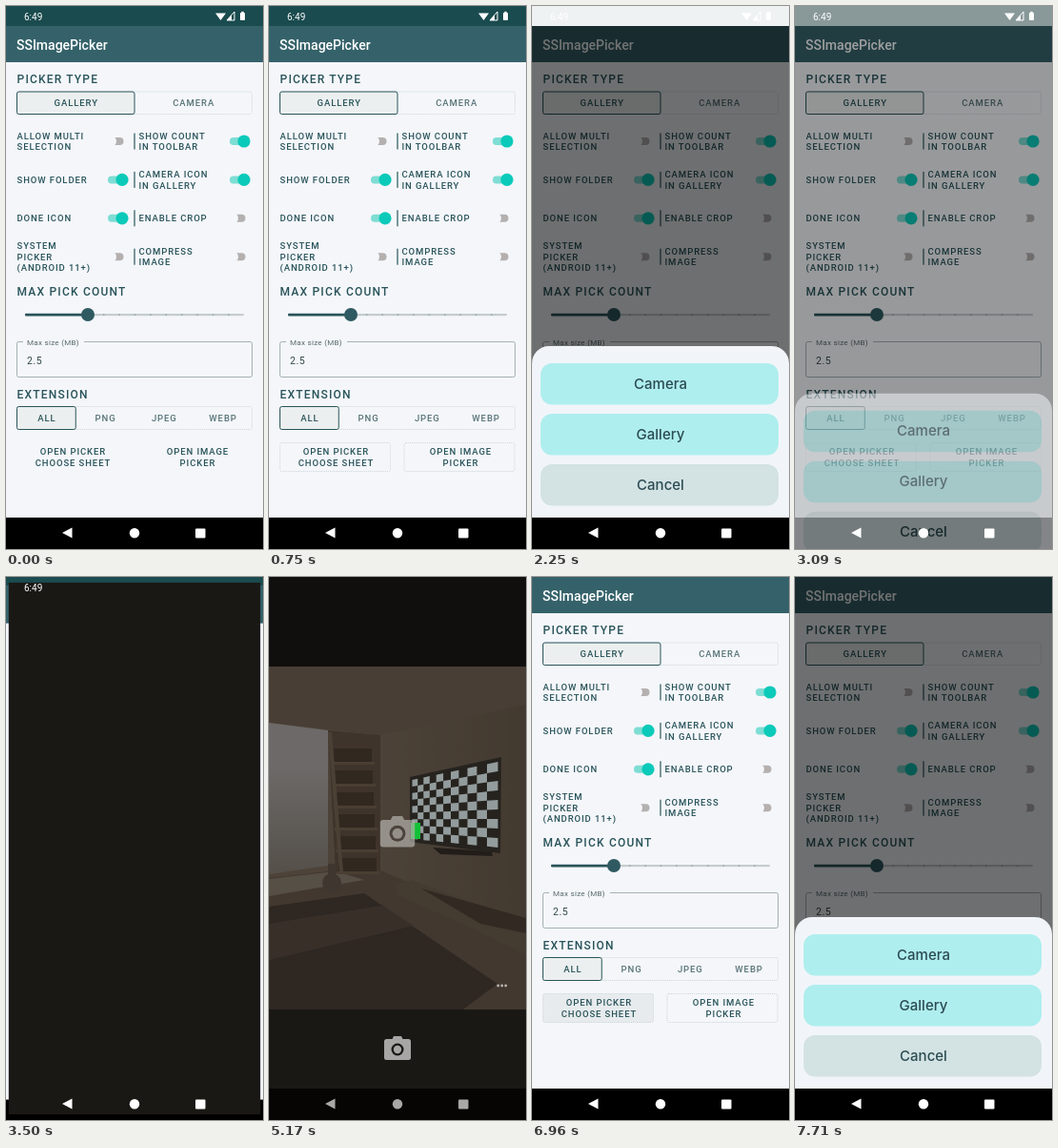
Animation, 270 px wide and 570 px high, one loop 7750 ms. Source, as an HTML page:

```html
<!DOCTYPE html>
<html lang="en">
<head>
<meta charset="utf-8">
<title>Image picker demo</title>
<style>
  html, body { margin: 0; width: 100%; height: 100%; overflow: hidden; background: #000; }
  svg { display: block; width: 100vw; height: 100vh; }
  text { font-family: Roboto, sans-serif; font-weight: 500; }
  .sheet text { font-family: Inter, sans-serif; }
  .thin { font-weight: 400; }
</style>
</head>
<body>
<svg id="stage" viewBox="0 0 270 570"></svg>
<script>
const LOOP = 7750;
const INK = '#29545a', SOFT = '#587478', PAPER = '#f4f6fa', TEAL = '#0bcab9', DARK = '#1a1815';

// ---- drawing helpers ----
const range = n => [...Array(n).keys()];
const rect = (x, y, w, h, fill, more = '') =>
  `<rect x="${x}" y="${y}" width="${w}" height="${h}" fill="${fill}" ${more}/>`;
const circle = (x, y, r, fill) => `<circle cx="${x}" cy="${y}" r="${r}" fill="${fill}"/>`;
const poly = (points, fill, more = '') => `<polygon points="${points}" fill="${fill}" ${more}/>`;
const group = (id, body, more = '') => `<g id="${id}" ${more}>${body}</g>`;

// y is the middle of the capitals
const text = (x, y, s, size = 9.5, gap = 0.9, fill = INK, more = '') =>
  `<text x="${x}" y="${y + size * 0.355}" font-size="${size}" letter-spacing="${gap}" fill="${fill}" ${more}>${s}</text>`;
const middle = (x, y, s, fill = INK) => text(x + 0.45, y, s, 9.5, 0.9, fill, 'text-anchor="middle"');
const heading = (y, s) => text(11.5, y, s, 12, 1.2);
const thin = (x, y, s, size, gap, fill) => text(x, y, s, size, gap, fill, 'class="thin"');
const lines = (x, y, list, draw = text) =>
  list.map((s, i) => draw(x, y + (i - (list.length - 1) / 2) * 11.5, s)).join('');

const outline = (x, y, w, h, on) => on
  ? rect(x, y, w, h, '#ecefef', `rx="2" stroke="${INK}"`)
  : rect(x, y, w, h, 'none', 'rx="2" stroke="#c3ccd0" stroke-width=".8" stroke-dasharray="1 1"');

const toggle = (x, y, on) => on
  ? rect(x - 4, y - 4, 20, 8, '#7eddd4', 'rx="4"') + circle(x + 11, y, 6.6, TEAL)
  : rect(x - 3, y - 4, 15.5, 8, '#b4b0af', 'rx="4"') + circle(x - 1, y, 6, PAPER);

// equal tabs with the first one chosen
const tabs = (y, h, names) => {
  const w = 247 / names.length;
  return outline(11.5, y, 247, h) + outline(11.5, y, w, h, true) +
    names.map((s, i) => middle(11.5 + (i + 0.5) * w, y + h / 2, s, i ? SOFT : INK)).join('');
};

const cameraIcon = (x, y, scale, fill, hole) =>
  `<g transform="translate(${x} ${y}) scale(${scale})">` +
  poly('-6,-9 -4,-13 4,-13 6,-9', fill) + rect(-14, -10, 28, 22, fill, 'rx="2.5"') +
  circle(0, 1, 6.5, hole) + circle(0, 1, 4.2, fill) + '</g>';

// ---- settings page ----
const options = [
  ['ALLOW MULTI|SELECTION', false, 'SHOW COUNT|IN TOOLBAR', true],
  ['SHOW FOLDER', true, 'CAMERA ICON|IN GALLERY', true],
  ['DONE ICON', true, 'ENABLE CROP', false],
  ['SYSTEM|PICKER|(ANDROID 11+)', false, 'COMPRESS|IMAGE', false]
];

function option([left, leftOn, right, rightOn], i) {
  const y = 142 + i * 40.4;
  return lines(11.5, y, left.split('|')) + toggle(111, y, leftOn) +
    rect(134.2, y - 8.5, 1.6, 17, '#5d7d82') +
    lines(139.5, y, right.split('|')) + toggle(239, y, rightOn);
}

const slider = y =>
  rect(20, y - 1, 230, 2.2, '#c6cccf', 'rx="1"') +
  range(14).map(i => rect(20 + i * 16.4, y - 0.6, 1.4, 1.4, '#8fa1a5')).join('') +
  rect(20, y - 1.2, 66, 2.6, INK, 'rx="1"') + circle(86, y, 7, '#2f5a61');

const sizeField = () =>
  rect(11.5, 352.5, 247, 37, 'none', 'rx="2" stroke="#8fa0a3" stroke-width=".8"') +
  rect(18, 349, 64, 8, PAPER) +
  thin(22, 353, 'Max size (MB)', 8, 0.3, '#57696c') + thin(22, 372, '2.5', 10.5, 0.5, '#34484b');

const settings = () =>
  rect(0, -1, 270, 22.5, '#1a4b4e') + rect(0, 21, 270, 38, '#35626a') +
  text(11, 41, 'SSImagePicker', 14, 0, '#fff') +
  heading(77, 'PICKER TYPE') + tabs(90, 23.5, ['GALLERY', 'CAMERA']) +
  options.map(option).join('') +
  heading(300, 'MAX PICK COUNT') + slider(324) + sizeField() +
  heading(408, 'EXTENSION') + tabs(420.5, 24, ['ALL', 'PNG', 'JPEG', 'WEBP']) +
  group('press', rect(11.5, 458.5, 116, 30, '#e7ebed', 'rx="2"')) +
  group('frames', outline(11.5, 458.5, 116, 30) + outline(142, 458.5, 116, 30)) +
  lines(70, 473.5, ['OPEN PICKER', 'CHOOSE SHEET'], middle) +
  lines(201, 473.5, ['OPEN IMAGE', 'PICKER'], middle);

// ---- bottom sheet ----
const sheet = () =>
  '<path d="M0 537V375a18 18 0 0 1 18-18H252a18 18 0 0 1 18 18V537Z" fill="#f1f5f9"/>' +
  ['Camera', 'Gallery', 'Cancel'].map((name, i) => {
    const y = 375 + i * 53;
    return rect(9, y, 250, 43.5, i < 2 ? '#afeeee' : '#d3e2e3', 'rx="12"') +
      text(135, y + 21.5, name, 15, 0, '#2b4b52', 'text-anchor="middle"');
  }).join('');

// ---- room seen by the camera ----
function screen() {
  const cols = 11, rows = 9;
  // the right edge is nearer, so cells widen towards it
  const at = (c, r) => {
    const u = c / cols, s = u * 62 / (91 - 29 * u);
    const top = 213 - 19 * s, height = 62 + 28 * s;
    return `${(150.5 + 90 * s).toFixed(1)},${(top + height * r / rows).toFixed(1)}`;
  };
  const cells = range(cols * rows).filter(i => i % 2 === 0).map(i => {
    const c = Math.floor(i / rows), r = i % rows;
    return poly([at(c, r), at(c + 1, r), at(c + 1, r + 1), at(c, r + 1)].join(' '), '#939c9c');
  });
  return poly('148,210 244,189 243,290 148,278', '#26231f') + cells.join('') +
    rect(149, 258, 10, 17, '#12c037');
}

const shelves = () =>
  poly('62,161 117,166 117,308 70,311', '#8d7761') +
  range(6).map(i => rect(68 + i, 180 + i * 23, 40, 14, '#6d5a49') +
    rect(66 + i, 194 + i * 23, 45, 3, '#a88f73')).join('') +
  poly('62,163 66,163 78,310 74,310', '#ab9277');

const room = () =>
  rect(0, 0, 270, 94, '#100f0e') + rect(0, 94, 270, 360, 'url(#wall)') +
  poly('0,94 270,94 270,134 117,166 0,153', '#a38e78') +
  poly('0,153 62,161 62,303 0,312', 'url(#window)') +
  poly('0,316 70,308 117,308 270,372 270,454 0,454', '#94806b') +
  poly('0,317 70,309 100,318 0,335', '#c4b5a1') +
  shelves() +
  poly('0,346 100,332 240,427 204,454 0,454', '#66584c') +
  poly('0,364 118,345 152,366 0,402', '#7d6c5d') +
  poly('134,322 150,318 270,362 270,396 220,372 134,333', '#9a8670') +
  poly('160,327 270,358 270,374 222,364', '#6f5d4c') +
  poly('172,284 234,288 235,293 180,291', '#4d4238') +
  circle(66, 321, 10, '#8e7d6c') + rect(62, 301, 8, 14, '#8e7d6c');

const cameraPage = () =>
  rect(0, 0, 270, 570, DARK) +
  group('room', room() + group('shade', rect(0, 94, 270, 360, '#050302')) + screen()) +
  group('splash', cameraIcon(135, 268, 1.3, '#b5b2ac', '#4c453e')) +
  group('controls', cameraIcon(135, 495, 1, '#fff', DARK) +
    range(3).map(i => circle(240.7 + i * 4, 429, 1.4, '#fff')).join('')) +
  group('cameraNav', rect(0, 537, 270, 33, '#060504'));

// ---- system icons ----
const statusIcons = () =>
  poly('220,7.5 231,7.5 225.5,15', '#fff') +
  poly('232,15 240,15 240,6', 'none', 'stroke="#fff"') + poly('232,15 237,15 237,9.5', '#fff') +
  rect(246, 7, 5, 8, '#fff', 'rx=".8"') + rect(247.3, 5.8, 2.4, 2, '#fff');

const navIcons = () =>
  poly('59,553 69.5,547.5 69.5,558.5', '#fff') + circle(135, 553.3, 5.2, '#fff') +
  rect(199, 548.5, 10.5, 10, '#fff', 'rx="1"');

const stage = document.getElementById('stage');
stage.innerHTML = `<defs>
  <linearGradient id="wall"><stop offset=".35" stop-color="#ae9a83"/><stop offset="1" stop-color="#97836d"/></linearGradient>
  <linearGradient id="window" x2="0" y2="1"><stop offset=".3" stop-color="#f6f3ef"/><stop offset="1" stop-color="#c0b6a8"/></linearGradient></defs>` +
  group('page', rect(0, 0, 270, 570, PAPER) + group('content', settings()) + rect(0, 537, 270, 33, '#000')) +
  group('dim', rect(0, 0, 270, 570, '#000')) +
  group('strip', rect(0, -1, 270, 22, '#eef2f2')) +
  group('sheet', sheet(), 'class="sheet"') +
  group('camera', cameraPage()) +
  group('clock', thin(19, 11, '6:49', 10, 0, '#fff')) +
  group('signals', statusIcons()) +
  group('nav', navIcons());

const part = {};
stage.querySelectorAll('g[id]').forEach(g => { part[g.id] = g; });

// ---- motion ----
const easeIn = p => p * p;
const easeOut = p => 1 - (1 - p) ** 2;
const easeInOut = p => p < 0.5 ? 2 * p * p : 1 - 2 * (1 - p) ** 2;
const ramp = (t, from, to, ease = p => p) => ease(Math.max(0, Math.min(1, (t - from) / (to - from))));
const pulse = (t, a, b, c, d) => ramp(t, a, b) - ramp(t, c, d);

const OPEN = 1670, CLOSE = 2926, LAUNCH = 3250, PREVIEW = 4710, BACK = 5950, REOPEN = 7090;

const fade = (name, v) => part[name].setAttribute('opacity', v);
const slide = (name, y) => part[name].setAttribute('transform', `translate(0 ${y})`);
const zoom = (name, k) =>
  part[name].setAttribute('transform', `translate(135 285) scale(${k}) translate(-135 -285)`);

function draw(t) {
  // settings page and its buttons
  fade('frames', ramp(t, 0, 800));
  fade('press', pulse(t, 1300, 1420, 1750, 1950) + pulse(t, 6900, 6960, 7150, 7350));
  const shift = -21 * ramp(t, 6200, 6250);
  slide('content', shift);

  // sheet
  const shown = pulse(t, OPEN, OPEN + 200, CLOSE, CLOSE + 364) + ramp(t, REOPEN, REOPEN + 200);
  const raised = ramp(t, OPEN, OPEN + 250, easeOut) - ramp(t, CLOSE, CLOSE + 250, easeIn) +
    ramp(t, REOPEN, REOPEN + 250, easeOut);
  fade('dim', 0.55 * (pulse(t, OPEN, OPEN + 250, CLOSE, CLOSE + 530) + ramp(t, REOPEN, REOPEN + 250)));
  fade('sheet', shown);
  fade('strip', shown);
  slide('sheet', 114 * (1 - raised));
  slide('strip', shift);

  // camera page comes and goes
  const back = ramp(t, BACK, BACK + 340, easeInOut);
  zoom('page', t < PREVIEW ? 1 + 0.05 * ramp(t, LAUNCH, LAUNCH + 350, easeOut) : 1.1 - 0.1 * back);
  zoom('camera', 0.85 + 0.15 * ramp(t, LAUNCH, LAUNCH + 400, easeOut) - 0.1 * back);
  fade('camera', pulse(t, LAUNCH, LAUNCH + 150, BACK + 35, BACK + 285));
  fade('splash', 0.7 * pulse(t, 4000, 4380, 5170, 5400));
  fade('room', ramp(t, PREVIEW, 5170));
  fade('shade', 0.57 * (1 - ramp(t, 5170, 5460)));
  fade('controls', ramp(t, PREVIEW, 5460));
  fade('cameraNav', pulse(t, PREVIEW, 5170, BACK, BACK + 60));

  // system icons
  fade('clock', 1 - ramp(t, 4000, 4380));
  fade('signals', 1 - ramp(t, LAUNCH, LAUNCH + 100));
  fade('nav', 1 - 0.35 * pulse(t, PREVIEW, 5170, 5170, 5460));
}

const start = performance.now();
function tick() {
  draw((performance.now() - start) % LOOP);
  requestAnimationFrame(tick);
}
tick();
</script>
</body>
</html>
```
